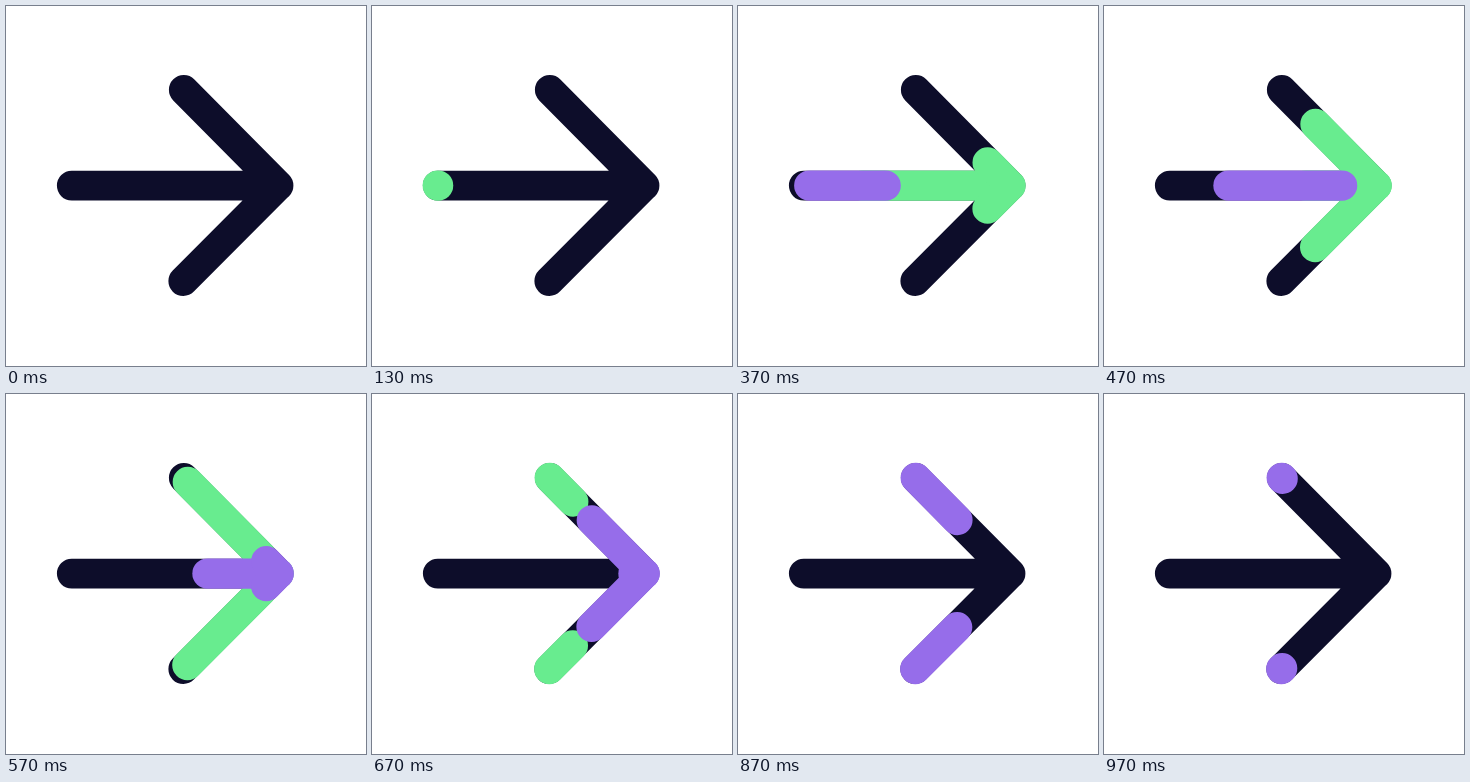
An HTML page with a canvas for the animation above (1010 ms loop, 360x360 px).

```html
<!DOCTYPE html>
<html>
<head>
<meta charset="utf-8">
<style>
html, body { margin: 0; height: 100%; overflow: hidden; background: #fff; }
canvas { display: block; }
</style>
</head>
<body>
<canvas id="stage" width="360" height="360"></canvas>
<script>
const ctx = document.getElementById('stage').getContext('2d');
const LOOP = 1010, STEP = 100 / 3;
const DARK = '#0d0d2a', GREEN = '#68ec8f', PURPLE = '#966dea';
const TIP = [272.5, 179.6];
const SHAFT = [[65.8, 179.6], TIP];
const ARMS = [[TIP, [177.8, 83.9]], [TIP, [177.3, 275.1]]];

// Each stroke grows by `head` and is then erased by `tail`: [start, duration] in steps.
const STROKES = [
  { color: GREEN, lines: [SHAFT], head: [3.8, 9.7], tail: [6.85, 11.8] },
  { color: GREEN, lines: ARMS, head: [7.55, 10.8], tail: [15, 7.4] },
  { color: PURPLE, lines: [SHAFT], head: [6.85, 9.65], tail: [9.85, 11.8] },
  { color: PURPLE, lines: ARMS, head: [14.84, 9.6], tail: [22, 7.4] }
];

function ease(step, [start, duration]) {
  const u = Math.min(1, Math.max(0, (step - start) / duration));
  return u * u * (3 - 2 * u);
}

function drawLines(lines, color, width, from = 0, to = 1) {
  ctx.strokeStyle = color;
  ctx.lineWidth = width;
  ctx.beginPath();
  for (const [[x0, y0], [x1, y1]] of lines) {
    const at = k => [x0 + (x1 - x0) * k, y0 + (y1 - y0) * k];
    ctx.moveTo(...at(from));
    ctx.lineTo(...at(to));
  }
  ctx.stroke();
}

function draw(step) {
  ctx.fillStyle = '#fff';
  ctx.fillRect(0, 0, 360, 360);
  ctx.lineCap = 'round';
  drawLines([SHAFT, ...ARMS], DARK, 29.8);
  for (const { color, lines, head, tail } of STROKES) {
    const from = ease(step, tail), to = ease(step, head);
    if (to > 0 && from < 1) drawLines(lines, color, 30.4, from, to);
  }
}

// 30 steps per second, each starting on a multiple of 10 ms.
function tick() {
  const t = Math.floor(performance.now() % LOOP / 10) * 10;
  draw(Math.min(29, Math.floor((t + 3.4) / STEP)));
  requestAnimationFrame(tick);
}
tick();
</script>
</body>
</html>
```
